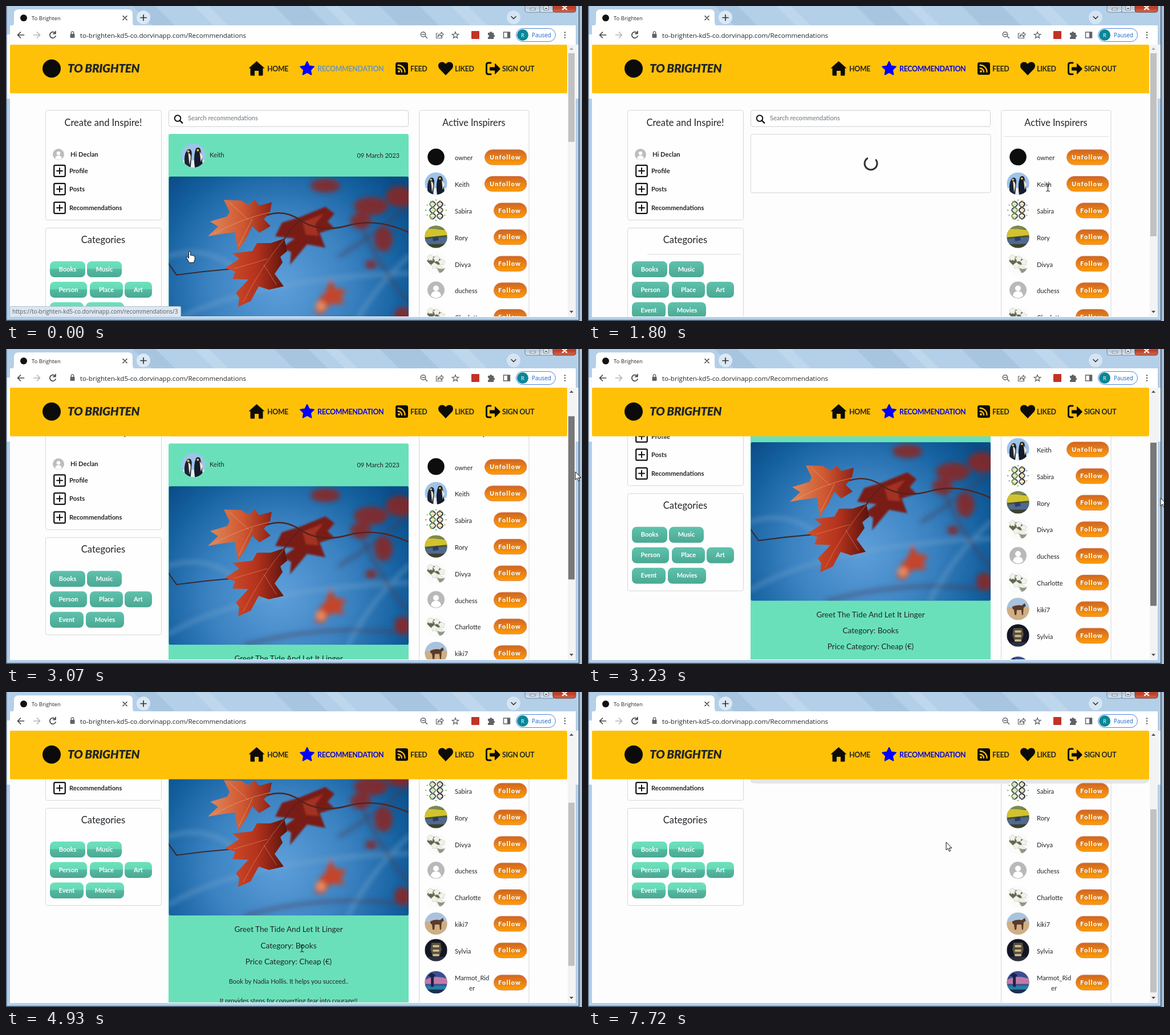
An HTML page for the animation above (8 s loop, 1010x554 px).

```html
<!DOCTYPE html>
<html lang="en">
<head>
<meta charset="utf-8">
<title>To Brighten</title>
<style>
html, body { margin: 0; width: 100%; height: 100%; overflow: hidden; background: #fff; }
svg { display: block; width: 100vw; height: 100vh; }
text { font-family: Lato, sans-serif; white-space: pre; }
.ui { font-family: "Open Sans", "Noto Sans", sans-serif; }
</style>
</head>
<body>
<svg id="stage" viewBox="0 0 1010 554" xmlns="http://www.w3.org/2000/svg"></svg>
<script>
const LOOP = 8000;
const INK = '#212529';

// ---------- drawing helpers ----------
const rect = (x, y, w, h, fill, rest = '') =>
  `<rect x="${x}" y="${y}" width="${w}" height="${h}" fill="${fill}" ${rest}/>`;
const circle = (x, y, r, fill, rest = '') =>
  `<circle cx="${x}" cy="${y}" r="${r}" fill="${fill}" ${rest}/>`;
const path = (d, fill, rest = '') => `<path d="${d}" fill="${fill}" ${rest}/>`;
const line = (d, color, width = 1.5, rest = '') =>
  path(d, 'none', `stroke="${color}" stroke-width="${width}" stroke-linecap="round" stroke-linejoin="round" ${rest}`);
const text = (x, y, size, str, rest = '') =>
  `<text x="${x}" y="${y}" font-size="${size}" fill="${INK}" ${rest}>${str}</text>`;
const group = (inner, rest = '') => `<g ${rest}>${inner}</g>`;
const card = (x, y, w, h) =>
  rect(x + .5, y + .5, w, h, '#fefefe', 'rx="3" stroke="#d6d6d6"');
const gradient = (id, stops) =>
  `<linearGradient id="${id}" x2="0" y2="1">` +
  stops.map(([o, c]) => `<stop offset="${o}" stop-color="${c}"/>`).join('') + '</linearGradient>';

const bold = 'font-weight="700"';
const mid = 'text-anchor="middle"';

const defs = `<defs>
  <clipPath id="view"><rect x="7" y="68" width="978" height="478"/></clipPath>
  <clipPath id="photoBox"><rect x="285.5" y="300" width="420.5" height="279" rx="3"/></clipPath>
  <clipPath id="disc"><circle r="20"/></clipPath>
  <filter id="blur" x="-30%" y="-30%" width="160%" height="160%"><feGaussianBlur stdDeviation="4"/></filter>
  <filter id="soft" x="-30%" y="-30%" width="160%" height="160%"><feGaussianBlur stdDeviation="1.4"/></filter>
  <radialGradient id="sky" gradientUnits="userSpaceOnUse" cx="480" cy="490" r="270">
    <stop offset="0" stop-color="#5e9fda"/><stop offset=".45" stop-color="#3c83c2"/>
    <stop offset=".8" stop-color="#14609f"/><stop offset="1" stop-color="#0a4c86"/>
  </radialGradient>
  <linearGradient id="leafA"><stop offset="0" stop-color="#e08a5c"/><stop offset=".55" stop-color="#cf5731"/><stop offset="1" stop-color="#8f2115"/></linearGradient>
  <linearGradient id="leafB"><stop offset="0" stop-color="#d0502c"/><stop offset=".5" stop-color="#b5331d"/><stop offset="1" stop-color="#5b120d"/></linearGradient>
  ${gradient('orange', [[0, '#cf6522'], [.45, '#e67e16'], [1, '#ff9c00']])}
  ${gradient('tealFlat', [[0, '#5fc2ad'], [1, '#4aa893']])}
  ${gradient('tealSplit', [[0, '#6ce2bd'], [.45, '#66d8b5'], [.5, '#55b9a2'], [1, '#4aa893']])}
  ${gradient('glass', [[0, '#e9f1f9'], [.5, '#b9c9da'], [1, '#dbe7f2']])}
  ${gradient('closeRed', [[0, '#d9826f'], [.5, '#bc3a24'], [1, '#d4694f']])}
</defs>`;

// ---------- browser window ----------
function chrome() {
  const streaks = [[222, 40], [330, 26], [470, 60], [560, 22], [655, 70], [780, 30]]
    .map(([x, w], i) => path(`M${x} 0h${w}l34 34h${-w}z`, i % 2 ? '#c9def1' : '#9fbddb', 'opacity=".55"')).join('');
  const dark = '#5f6368';
  return rect(0, 0, 1010, 554, '#a9bfd6') + rect(0, 0, 1005, 554, '#b4cfe8') + streaks +
    rect(1, 50, 6, 113, '#f7fafd') + rect(999, 68, 5, 95, '#f1f6fb') +
    rect(0, 0, 1.5, 554, '#5c7088') + rect(1004, 0, 1.5, 554, '#46566a') +
    rect(0, 552, 1005, 2, '#4d6076') +
    rect(910, -6, 27, 17, 'url(#glass)', 'rx="4" stroke="#71859b"') +
    rect(936, -6, 24, 17, 'url(#glass)', 'stroke="#71859b"') +
    rect(959, -6, 40, 17, 'url(#closeRed)', 'rx="4" stroke="#6d3a36"') +
    rect(919, 4, 9, 3, '#fff', 'stroke="#52606f" stroke-width=".8"') +
    rect(943, 0, 8, 7, '#fff', 'stroke="#52606f" stroke-width=".8"') + rect(945, 3, 4, 2, '#52606f') +
    line('M976 0l7 6m0-6l-7 6', '#fff', 2.4) +
    path('M7 36q7 0 7-8V14q0-8 8-8h192q8 0 8 8v14q0 8 8 8z', '#fff') +
    rect(7, 34, 992, 513, '#fff') +
    circle(31, 21, 6, '#111') + text(45, 24.5, 9.5, 'To Brighten', 'class="ui"') +
    line('M205 17.5l7 7m0-7l-7 7', '#333', 1.4) +
    circle(241, 20, 12, '#dce9f5') + line('M236 20.5h10m-5-5v10', '#333', 1.7) +
    circle(890, 20, 12, '#d5e4f2') + line('M886 18.5l4 4 4-4', '#333', 1.6) +
    line('M31.5 51h-11m5-5l-5 5 5 5', '#444', 1.7) + line('M48.5 51h11m-5-5l5 5-5 5', '#b4b7ba', 1.7) +
    line('M86.5 48a5.3 5.3 0 1 0 .6 4.8m-.2-8.4v4.2h-4.2', '#444', 1.7) +
    rect(112.5, 49, 8, 7, dark, 'rx="1"') + line('M114.3 49v-2a2.2 2.2 0 0 1 4.4 0v2', dark, 1.3) +
    text(130, 55.5, 11.6, 'to-brighten-kd5-co.dorvinapp.com/Recommendations', 'class="ui"') +
    line('M735 53l3.5 3.5M729.5 50h4.5', dark, 1.5) + circle(731.5, 50, 4.3, 'none', `stroke="${dark}" stroke-width="1.4"`) +
    line('M757 48h-2.5v8.5h10V54M757 54q.5-5 6-5.200v-2.800l4 4-4 4v-2.600q-3.500 0-6 2.600z', dark, 1.2) +
    path(star(788, 51.5, 6, 2.6), 'none', `stroke="${dark}" stroke-width="1.3"`) +
    rect(816, 44, 14, 14, '#c23326', 'rx="1"') +
    path('M845 47h3.200a2 2 0 0 1 4 0h3v3.500a2 2 0 0 1 0 4V58h-10.200v-3.200a2 2 0 0 0 0-4z', dark) +
    rect(872.5, 46, 11, 10, 'none', `stroke="${dark}" stroke-width="1.500"`) + rect(879, 46, 5, 10, dark) +
    rect(894.5, 39.5, 69, 23, '#fff', 'rx="11.5" stroke="#4a86d8"') + circle(906, 51, 10, '#0a8796') +
    text(906, 54.5, 9.5, 'R', `class="ui" style="fill:#fff" ${mid}`) +
    text(922, 54.8, 9.9, 'Paused', 'class="ui" style="fill:#1a63c8"') +
    [46.5, 51, 55.5].map(y => circle(980, y, 1.3, dark)).join('');
}

function star(x, y, outer, inner) {
  let d = '';
  for (let i = 0; i < 10; i++) {
    const r = i % 2 ? inner : outer, a = (i / 5 - .5) * Math.PI;
    d += (i ? 'L' : 'M') + (x + r * Math.cos(a)).toFixed(2) + ' ' + (y + r * Math.sin(a)).toFixed(2);
  }
  return d + 'z';
}

function navBar() {
  const label = (x, str, rest = '') =>
    text(x, 114.7, 12.4, str, `${bold} letter-spacing="-.3" ${rest}`);
  return rect(7, 68, 977, 85.5, '#ffc107', 'rx="2"') + circle(80, 110, 16, '#0b0b0b') +
    text(108, 117, 20.8, 'TO BRIGHTEN', 'font-weight="900" font-style="italic" letter-spacing="-.4"') +
    path('M439.500 97l14 12.500h-3V121q0 1.500-1.500 1.500h-6V114h-7v8.500h-6q-1.500 0-1.500-1.500v-11.500h-3z', '#0b0b0b') +
    path(star(528, 110.5, 12.5, 6.2), '#00f', 'stroke="#00f" stroke-width="2" stroke-linejoin="round"') +
    rect(683, 99, 22, 22, '#0b0b0b', 'rx="3.5"') + circle(689, 115, 2, '#ffc107') +
    line('M687.500 109.500a6.500 6.500 0 0 1 6.500 6.500M687.500 104a12 12 0 0 1 12 12', '#ffc107', 2.3) +
    path('M771 122l-11-11.500c-4-5-1.500-12 4.500-12 3 0 5 1.500 6.500 3.500 1.500-2 3.500-3.500 6.500-3.500 6 0 8.500 7 4.500 12z', '#0b0b0b') +
    line('M850 100h-4q-3.500 0-3.500 3.500v13q0 3.500 3.500 3.500h4', '#0b0b0b', 3) +
    path('M849 107.500h8V102q0-1.500 1.200-.5l8 8q.8 1 0 2l-8 8q-1.200 1-1.200-.5v-5.500h-8q-1 0-1-1v-4q0-1 1-1z', '#0b0b0b') +
    label(458, 'HOME') + label(546, 'RECOMMENDATION', 'id="current"') + label(709, 'FEED') +
    label(787, 'LIKED') + label(870, 'SIGN OUT');
}

// ---------- avatars, drawn on a disc of radius 20 ----------
const bouquet = rect(-20, -20, 40, 40, '#fbfbfa') +
  path('M-16-4q5-12 14-8t14 6q4 8-4 8T-8 4z', '#5d6b50') +
  [[-10, -10], [1, -8], [10, -2], [-3, 4], [6, 9]].map(([x, y]) =>
    path(`M${x} ${y - 6}q3 3 6 4-3 3-2 7-4-2-7 0 0-4-3-6z`, '#f3f1ea', 'stroke="#c9cbc0" stroke-width=".7"')).join('') +
  path('M2 8q8 4 14 0-3 9-10 9z', '#8d9a86');

function helix(x, a, b) {
  const strand = (s, c) => line(`M${x} -16q${10 * s} 5.300 0 10.600t0 10.600 0 10.600`, c, 2);
  return [-13, -10, -2, 1, 8, 12].map(y => line(`M${x - 3} ${y}h6`, '#c9a84c', 1)).join('') + strand(1, a) + strand(-1, b);
}

const scenes = {
  mark: circle(0, 0, 15, '#0d0d0d'),
  birds: rect(-20, -20, 40, 40, '#9fc4ea') + rect(-20, 8, 40, 12, '#e8eef4') +
    path('M-14 20q-4-22 4-30 6-3 7 6l-2 24z', '#1b2436') + path('M2 20q-3-20 2-32 7-4 8 5l4 27z', '#141b2c') +
    path('M-9-4q5 0 4 10l-2 10z', '#e9e3c8') + path('M10-7l5 8-3 10z', '#f0ead2') +
    circle(-9, -7, 2, '#e9b93d') + circle(7, -9, 2, '#e9b93d'),
  helix: rect(-20, -20, 40, 40, '#fff') + helix(-6, '#3c4a55', '#5d9450') + helix(7, '#22262b', '#4a5560') +
    [0, 1, 2, 3, 4, 5, 6, 7, 8, 9, 10, 11].map(i =>
      circle(18 * Math.cos(i * .524), 18 * Math.sin(i * .524), 1.2, ['#7fae4a', '#d8a33c', '#79a7c9'][i % 3])).join(''),
  field: rect(-20, -20, 40, 40, '#46562f') + path('M-20-16l40 4v9l-40 4z', '#d2c22f') + rect(-20, -20, 40, 6, '#7b8a4f') +
    path('M-20 4l40-4v12l-40 3z', '#52688f') + path('M-6 1l9-2 2 7-10 2z', '#2c3f66') + rect(-20, 13, 40, 7, '#39442c'),
  bouquet,
  blank: circle(0, 0, 15, '#b9b9b9') + circle(0, -3, 5, '#fff') + path('M-9 10q1-8 9-8t9 8q-9 8-18 0z', '#fff'),
  cow: rect(-20, -20, 40, 40, '#aac3dc') + rect(-20, -3, 40, 23, '#cfae84') +
    path('M-10-4q8-4 17-2l5-4 2 5-4 3-1 13h-2l-1-9h-8l-1 9h-3l-1-9q-4-2-3-6z', '#5a3a2a'),
  lamps: rect(-20, -20, 40, 40, '#141622') + path('M-8-13h16l2 12-4 12h-12l-4-12z', '#57503f') +
    [-9, -1, 7].map(y => rect(-6, y, 12, 4, '#cbb88a', 'rx="2"')).join('') + rect(-20, 12, 40, 8, '#2b3144'),
  dusk: rect(-20, -20, 40, 40, '#3b4f93') + path('M-20-4q20-10 40-2v9h-40z', '#c07aa6') +
    path('M-20 6h40v14h-40z', '#2a7ea6') + path('M-9 8v-17l-5-3 6-5 7 4-3 4v17z', '#1b2346') + rect(-20, 13, 40, 7, '#1c2f54')
};
const avatar = (x, y, r, kind) =>
  group(scenes[kind], `transform="translate(${x} ${y}) scale(${r / 20})" clip-path="url(#disc)"`);

// ---------- page ----------
const people = [
  ['owner', 'mark', 1], ['Keith', 'birds', 1], ['Sabira', 'helix'], ['Rory', 'field'], ['Divya', 'bouquet'],
  ['duchess', 'blank'], ['Charlotte', 'bouquet'], ['kiki7', 'cow'], ['Sylvia', 'lamps'], ['Marmot_Rid', 'dusk']
];

function person([name, kind, followed], i) {
  const y = i < 9 ? 266 + 46.8 * i : 697, x = followed ? 839 : 855;
  const nameY = i < 9 ? y + 5.3 : y - 4;
  return avatar(754, y - .5, kind === 'blank' ? 20 : 19.7, kind) + text(787, nameY, 11.2, name) +
    (i === 9 ? text(817, y + 14, 11.2, 'er', mid) : '') +
    rect(x + .5, y - 13.2, 912.5 - x, 26.4, 'url(#orange)', 'rx="13.2" stroke="#d9825c"') +
    text(followed ? 848 : 863, y + 4, 11, followed ? 'Unfollow' : 'Follow',
      'font-weight="900" letter-spacing="1.2" style="fill:#fff;paint-order:stroke" stroke="#a85a14" stroke-width=".6"');
}

const categories = [
  ['Books', 77, 449, 62], ['Music', 142, 449, 61], ['Person', 77, 485, 65], ['Place', 147, 485, 58],
  ['Art', 208, 485, 48], ['Event', 77, 521, 59], ['Movies', 140, 521, 67]
];

function sidebar() {
  const item = (y, str) => rect(84.2, y - 9.8, 19.6, 19.6, '#fff', 'rx="2" stroke="#111" stroke-width="2.2"') +
    line(`M89 ${y}h10m-5-5v10`, '#111', 2) + text(111, y + 4, 11.2, str, bold);
  return card(69, 183, 203, 193) + text(170.5, 211, 16.5, 'Create and Inspire!', mid) +
    circle(92, 261, 10, '#bdbdbd') + circle(92, 259, 3.3, '#fff') + path('M86 268q1-5 6-5t6 5q-6 5-12 0z', '#fff') +
    text(113, 264.5, 11.2, 'Hi Declan', bold) +
    item(290, 'Profile') + item(322, 'Posts') + item(355, 'Recommendations') +
    card(69, 390, 203, 171) + text(170.5, 417, 16.5, 'Categories', mid) +
    rect(104, 436, 164, 1, '#dcdcdc', 'id="ruleLeft"') +
    group(categories.map(([, x, y, w]) => rect(x, y, w, 28, 'inherit', 'rx="8" style="fill:inherit"')).join(''), 'id="pills"') +
    categories.map(([str, x, y, w]) =>
      text(x + w / 2, y + 17.5, 11, str, `${bold} ${mid} style="fill:#fff"`)).join('');
}

function photo() {
  const blobs = [[560, 316, 26, 12], [640, 352, 30, 16], [690, 335, 24, 18], [622, 378, 18, 14], [662, 410, 16, 22],
    [695, 545, 14, 16], [640, 455, 10, 8]];
  const inner = rect(285, 300, 421, 279, 'url(#sky)') +
    group(line('M285 560Q420 480 706 470M600 579Q640 500 706 440M285 440Q350 420 400 460', '#7ba6cf', 7, 'opacity=".45"') +
      line('M420 579Q560 540 706 560M585 440Q650 400 706 350M620 380Q660 470 706 520', '#4b3a4c', 5, 'opacity=".6"') +
      blobs.map(([x, y, w, h]) => `<ellipse cx="${x}" cy="${y}" rx="${w}" ry="${h}" fill="#8e2721" opacity=".85"/>`).join('') +
      path('M545 520l16-18 8-24 8 18 20 4-10 14 8 10-26 0-14 18-14-4z', '#c4442c') + circle(552, 528, 9, '#e8895f'),
      'filter="url(#blur)"') +
    group(path('M472 405l12-24 32-10 44-18 16 12-12 14 12 12-26 8 10 26-32-6-30 36 2-22-16-8 22-16z', '#7a1d17') +
      path('M520 380l36-14-14 18 6 20-22-2z', '#a33122'), 'filter="url(#soft)"') +
    line('M285 453L299 473Q350 466 400 462', '#3a2b33', 2.2) +
    line('M440 376Q480 352 515 376T600 386T706 398', '#51231f', 2.4) +
    line('M488 410Q500 390 516 376', '#51231f', 2) +
    path('M463 362l3-17-22 6-8-10-10 9-14-8-30-1 10 21-4 8-30 9 14 9-18 17 30-5 18-2 4 33 14-20 12-24 12 12 20-12-12-12z', 'url(#leafA)') +
    path('M488 409l-24 8-24 0-8 14-35 4 12 10-25 16 18 6-5 13 28 1-22 24 6 8-2 16 22-10 14-26 18 6 26-6-16-22 14-20-4-10 12-10z', 'url(#leafB)') +
    line('M462 363Q410 375 366 400M432 374L408 422M425 376L392 346', '#f0a87c', .9, 'opacity=".7"') +
    line('M487 411Q450 455 416 520M458 445L400 462M452 455L474 490', '#ee9a6c', .9, 'opacity=".6"');
  return group(inner, 'clip-path="url(#photoBox)"');
}

function post() {
  const lines = [[608, 13.6, 'Greet The Tide And Let It Linger'], [636.5, 13.6, 'Category: Books'],
    [664.5, 13.6, 'Price Category: Cheap (€)'], [698.5, 11.1, 'Book by Nadia Hollis. It helps you succeed..'],
    [733, 11.1, 'It provides steps for converting fear into courage!!']];
  return rect(285, 225, 421, 700, '#6ae0ba', 'rx="3"') + avatar(329, 263, 21, 'birds') +
    text(357, 266.2, 11.2, 'Keith') + text(690, 267.2, 11, '09 March 2023', 'text-anchor="end"') + photo() +
    lines.map(([y, size, str]) => text(495.5, y, size, str, mid)).join('');
}

const page = group(
  rect(7, 68, 978, 900, '#fdfdfd') + sidebar() +
  rect(285.5, 183.5, 420, 28.5, '#fff', 'rx="3.5" stroke="#cfcfcf"') +
  circle(301, 197.5, 5.3, 'none', 'stroke="#111" stroke-width="2"') + line('M305 201.500l4.200 4.200', '#111', 2.4) +
  text(319, 201.2, 11.1, 'Search recommendations', 'style="fill:#6c757d"') +
  group(post(), 'id="post"') +
  group(card(285, 225, 420.5, 103) + line('M7.800-7.800A11 11 0 1 0 7.800 7.800', '#333', 3, 'id="spinner" stroke-linecap="butt"'), 'id="loading"') +
  card(724, 183, 192.5, 700) + text(820.5, 211, 16.3, 'Active Inspirers', mid) +
  rect(729, 229, 184, 1, '#dcdcdc', 'id="ruleRight"') +
  path('M285 330h699v9q-1 8-12 8H297q-12 0-12-4z', '#e6e6e6', 'id="shade"') +
  people.map(person).join(''), 'id="page"');

const scrollbar = rect(985, 68, 14, 478, '#f3f3f3') +
  path('M988 77l3.500-4 3.500 4z', '#505050', 'id="upArrow"') + path('M988 536l3.500 4 3.500-4z', '#505050') +
  rect(986, 83, 11, 156, '#c1c1c1', 'id="thumb"');

const status = group(rect(6.5, 528.5, 300, 19, '#dde7f1', 'rx="2" stroke="#b3c0cd"') +
  text(11, 541.3, 9.95, 'https://to-brighten-kd5-co.dorvinapp.com/recommendations/3', 'class="ui" style="fill:#555d66"'), 'id="status"');

const pointers =
  path('M0 0v14l3.200-3 2.300 5.300 2.200-1-2.300-5h4.600z', '#fff', 'id="arrow" stroke="#111" stroke-width="1"') +
  path('M-1.500 1q0-1.500 1.500-1.500t1.500 1.500v5.500q3-1 3 .5 2.500-1 2.700.8 2-.4 2 1.500v4.500l-2 5.500h-8l-3.200-6-2-3.200q1-2 3 0l1.500 1.700z', '#fff', 'id="hand" stroke="#111" stroke-width="1"') +
  line('M-3-6q3 0 3 1.500Q0-6 3-6M0-4.500v9M-3 6q3 0 3-1.500Q0 6 3 6', '#222', 1.1, 'id="ibeam"');

const stage = document.getElementById('stage');
stage.innerHTML = defs + chrome() + group(page, 'clip-path="url(#view)"') + navBar() + scrollbar + status + pointers;

// ---------- motion ----------
const moves = [ // time, x, y, pointer used until the next entry
  [0, 322, 432, 'hand'], [50, 322, 432, 'hand'], [300, 275, 438, 'arrow'], [620, 125, 455, 'hand'],
  [820, 110, 456, 'hand'], [1260, 110, 456, 'hand'], [1330, 205, 436, 'arrow'], [1700, 765, 323, 'ibeam'],
  [1800, 806, 320, 'ibeam'], [1900, 850, 295, 'arrow'], [2050, 965, 215, 'arrow'], [2530, 987, 182, 'arrow'],
  [2770, 994, 181, 'arrow'], [2950, 994, 181, 'arrow'], [3230, 1004, 262, 'arrow'], [3500, 1006, 283, 'arrow'],
  [3720, 1006, 292, 'arrow'], [3910, 1006, 292, 'arrow'], [4030, 620, 461, 'arrow'], [4280, 620, 461, 'arrow'],
  [4550, 565, 436, 'ibeam'], [4930, 519, 451, 'ibeam'], [5730, 519, 451, 'arrow'], [5910, 238, 324, 'arrow'],
  [6160, 238, 324, 'arrow'], [6320, 196, 292, 'hand'], [6450, 183, 279, 'hand'], [7530, 183, 279, 'arrow'],
  [7720, 628, 264, 'arrow']
];
const scrolls = [[2950, 0], [3230, 136], [3500, 173], [3720, 186]];

function segment(keys, t) {
  let i = 0;
  while (i < keys.length - 1 && keys[i + 1][0] <= t) i++;
  const a = keys[i], b = keys[i + 1] || a;
  const k = b === a ? 0 : Math.max(0, (t - a[0]) / (b[0] - a[0]));
  return { key: a, at: n => a[n] + (b[n] - a[n]) * k };
}

const part = id => document.getElementById(id);
const show = (id, on) => part(id).setAttribute('visibility', on ? 'visible' : 'hidden');
const set = (id, name, value) => part(id).setAttribute(name, value);

function draw(t) {
  const scroll = segment(scrolls, t).at(1);
  const empty = t >= 6960;
  const loading = (t >= 1260 && t < 2110) || empty;
  set('page', 'transform', `translate(0 ${-scroll})`);
  show('post', !loading);
  show('loading', loading);
  show('shade', empty);
  show('ruleLeft', t >= 1260 && t < 2950);
  show('ruleRight', t >= 1260 && t < 2110);
  show('status', t < 600);
  set('spinner', 'transform', `translate(496 277) rotate(${(t - 1800) / 750 * 360 - 80})`);
  part('pills').style.fill = t < 600 || t >= 3300 ? 'url(#tealSplit)' : 'url(#tealFlat)';
  part('current').style.fill = t < 120 ? '#6b94c4' : '#0000f0';

  const size = loading ? 322 : t < 1260 ? 156 : 287;
  set('thumb', 'height', size);
  set('thumb', 'y', 83 + scroll * (loading ? .663 : .6));
  set('thumb', 'fill', t >= 2770 && t < 3910 ? '#787878' : '#c1c1c1');
  set('upArrow', 'fill', scroll ? '#505050' : '#a8a8a8');

  const move = segment(moves, t);
  for (const id of ['arrow', 'hand', 'ibeam']) {
    show(id, id === move.key[3]);
    set(id, 'transform', `translate(${move.at(1)} ${move.at(2)})`);
  }
}

const start = performance.now();
function tick() {
  draw((performance.now() - start) % LOOP);
  requestAnimationFrame(tick);
}
tick();
</script>
</body>
</html>
```
